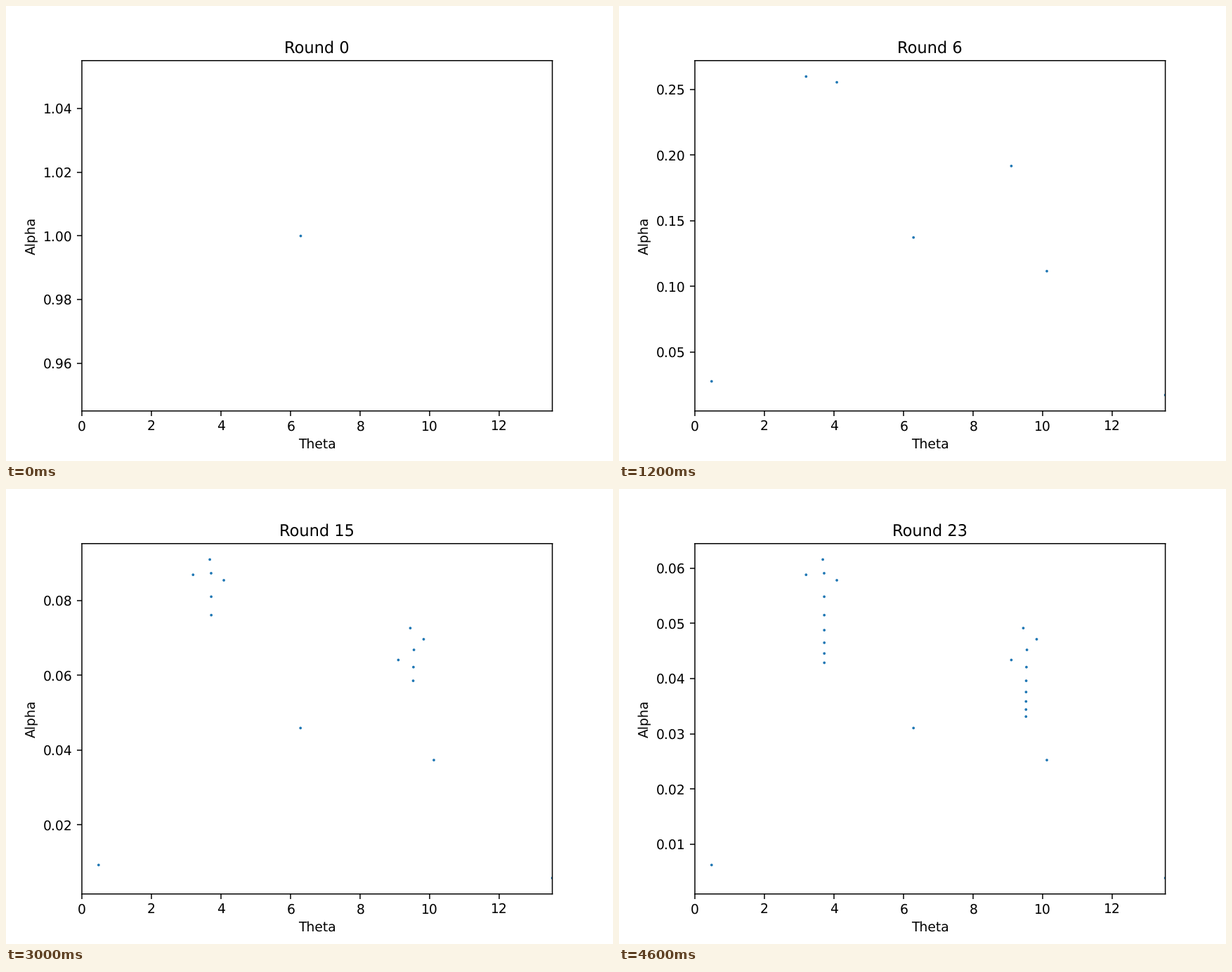
Animation, 864 px wide and 648 px high, one loop 4800 ms. Source, as a matplotlib script:

```python
import matplotlib.pyplot as plt
import numpy as np
from matplotlib.animation import FuncAnimation

ROUNDS = 24
THETA_MAX = 13.52

plt.rcParams.update({
    "font.family": "DejaVu Sans",
    "text.hinting": "none",
    "path.snap": False,
})

# Scattered first picks: (theta, unnormalised weight)
START = [
    (2 * np.pi, 1.0), (THETA_MAX, 0.125), (0.481, 0.201),
    (10.116, 0.813), (3.196, 1.894), (9.095, 1.397),
    (4.08, 1.862), (9.823, 1.518), (3.677, 1.983), (9.439, 1.583),
]


def settle(k, theta, offset, weight, rate):
    """k-th pick of a cluster: theta converges while the weight decays."""
    return theta + offset * 0.5 ** k, weight * (1 + rate * k) ** -0.4


def pick(n):
    """Point added in round n; late rounds alternate between two clusters."""
    if n < len(START):
        return START[n]
    k, side = divmod(n - len(START), 2)
    if side == 0:
        return settle(k, 3.72, -0.005, 1.903, 0.205)
    return settle(k, 9.515, 0.028, 1.456, 0.196)


theta, weight = np.array([pick(n) for n in range(ROUNDS)]).T

fig, ax = plt.subplots(figsize=(6.4, 4.8), dpi=135)


def draw(n):
    ax.clear()
    alpha = weight[:n + 1] / weight[:n + 1].sum()
    ax.scatter(theta[:n + 1], alpha, s=np.ones(n + 1))
    ax.set_xlim(0, THETA_MAX)
    ax.set_xlabel("Theta")
    ax.set_ylabel("Alpha")
    ax.set_title(f"Round {n}")


anim = FuncAnimation(fig, draw, frames=ROUNDS, interval=200,
                     repeat=True, repeat_delay=0)
plt.show()
```
